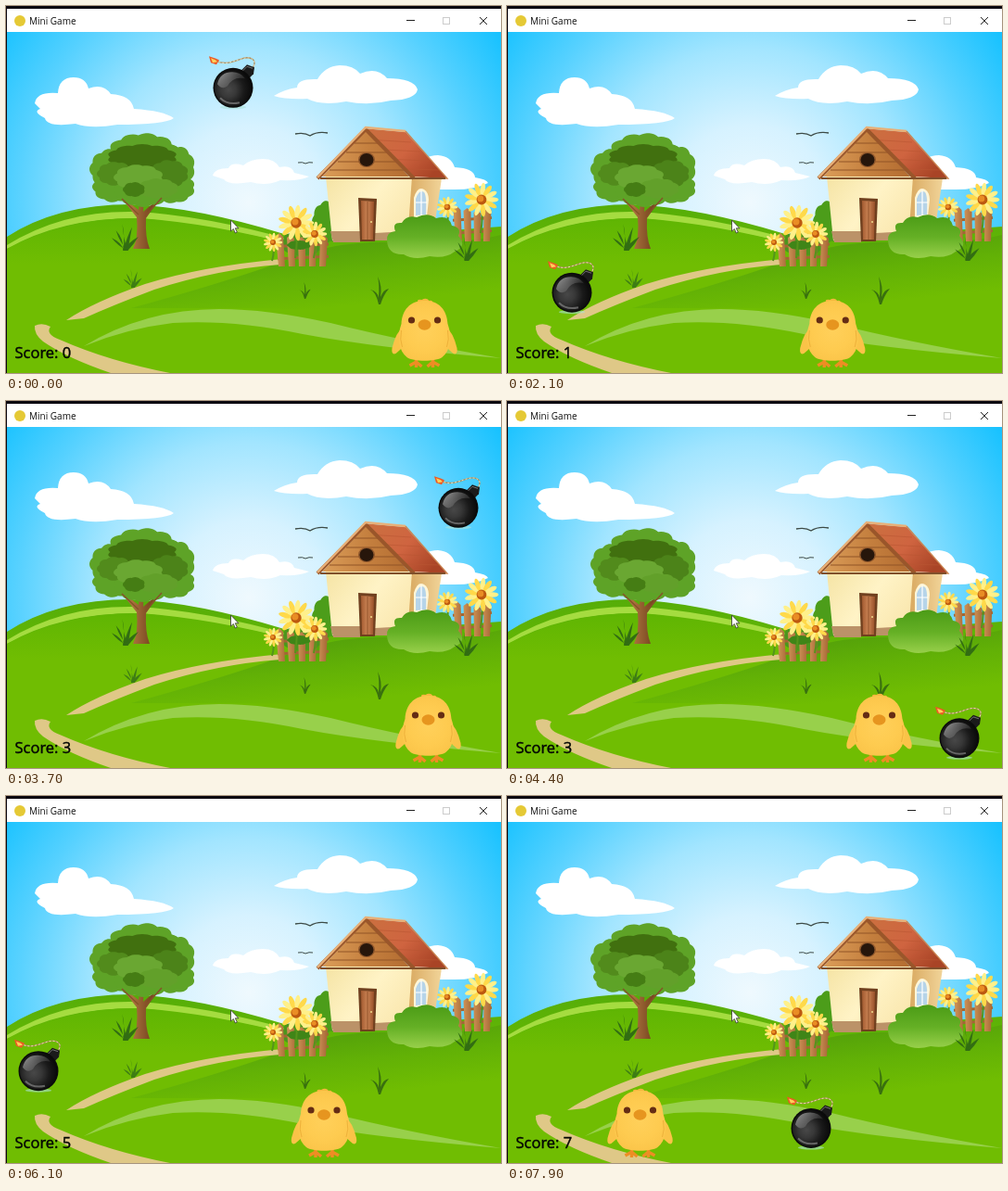
These frames come from a looping animation (534x396 px, 8000 ms). An HTML page with a canvas:

```html
<!DOCTYPE html>
<html lang="en">
<head>
<meta charset="utf-8">
<title>Mini Game</title>
<style>
html, body { margin: 0; width: 100%; height: 100%; overflow: hidden; background: #000; }
canvas { display: block; }
</style>
</head>
<body>
<canvas id="stage" width="534" height="396"></canvas>
<script>
const W = 534, H = 396, TOP = 28, LOOP = 8000;
const view = document.getElementById('stage').getContext('2d');
const scene = document.createElement('canvas');
scene.width = W;
scene.height = H;
let g = scene.getContext('2d');

function shape(d, color) { g.fillStyle = color; g.fill(new Path2D(d)); }
function line(d, color, width) {
  g.strokeStyle = color;
  g.lineWidth = width;
  g.stroke(new Path2D(d));
}
function oval(x, y, rx, ry, color, turn = 0) {
  g.beginPath();
  g.ellipse(x, y, rx, ry, turn, 0, 7);
  g.fillStyle = color;
  g.fill();
}
function ramp(x0, y0, x1, y1, ...colors) {
  const r = g.createLinearGradient(x0, y0, x1, y1);
  colors.forEach((c, i) => r.addColorStop(i / (colors.length - 1), c));
  return r;
}
function glow(x, y, r, ...colors) {
  const s = g.createRadialGradient(x, y, 0, x, y, r);
  colors.forEach((c, i) => s.addColorStop(i / (colors.length - 1), c));
  return s;
}
// A ring of lobes around a solid middle
function foliage(x, y, rx, ry, lobes, color) {
  g.beginPath();
  for (let i = 0; i <= lobes * 8; i++) {
    const a = i / (lobes * 8) * Math.PI * 2;
    const k = 0.91 + 0.09 * Math.abs(Math.sin(a * lobes / 2));
    g.lineTo(x + Math.cos(a) * rx * k, y + Math.sin(a) * ry * k);
  }
  g.fillStyle = color;
  g.fill();
}

function sky() {
  g.fillStyle = glow(262, 212, 335, '#eff9fe', '#d6f2ff', '#a2e5ff', '#56d1ff', '#10c0ff');
  g.fillRect(1, TOP, W, H);
  shape('M31 105Q33 92 56 94Q57 77 73 77Q86 77 89 89Q105 83 113 95Q135 96 138 111Q170 113 181 121Q172 128 120 128Q92 133 75 127Q44 131 42 121Q28 114 37 111Z', '#fff');
  shape('M289 97Q300 90 314 88Q314 78 336 79Q344 65 360 64Q375 64 382 73Q400 65 411 78Q440 78 444 90Q442 101 415 102Q391 108 367 103Q340 108 325 100Q302 101 289 97Z', '#fff');
  shape('M223 183Q225 175 240 175Q243 168 256 172Q264 165 277 165Q290 165 295 174Q308 171 311 180L327 184Q318 189 296 188Q281 195 264 190Q240 194 235 187Z', '#fff');
  shape('M440 175Q450 161 466 161Q480 162 484 174Q505 175 506 185Q519 187 520 191Q505 199 478 198L440 198Z', '#fff');
  line('M312 138Q322 136 328 140Q336 135 347 137', '#3c4a45', 1.3);
  line('M315 169Q320 168 323 170Q327 168 331 169', '#3c4a45', 1);
}

function land() {
  shape('M1 249Q55 214 135 214Q205 217 300 246L360 251L534 238V396H1Z', ramp(0, 213, 0, 300, '#55ad08', '#6dbd03'));
  shape('M1 258Q62 220 140 222Q215 226 310 253L305 256Q220 237 145 229Q60 228 1 262Z', '#a5dc40');
  shape('M1 262Q65 228 145 229Q225 235 310 258L534 268V396H1Z', ramp(0, 228, 0, 330, '#5fb503', '#70bd02', '#70bd02'));
  shape('M135 326Q230 300 295 277Q350 253 420 255Q490 258 534 247V350Q390 325 240 326Z', ramp(320, 254, 328, 328, '#529f0b', '#62b106', '#70bd02'));
  shape('M65 339Q95 319 150 300Q210 281 298 273L296 279Q228 284 160 306Q115 323 84 337Z', '#dfc887');
  shape('M31 345Q39 341 48 346Q42 354 58 360Q110 383 177 396H113Q66 380 40 362Q30 354 31 345Z', '#dfc887');
  shape('M84 367Q150 327 230 327Q282 327 350 342Q430 362 534 380Q400 369 320 354Q245 338 180 342Q130 348 84 367Z', '#98d04b');
}

function tuft(x, y, size, color = '#326d13') {
  for (const [dx, dy] of [[-13, -12], [-9, -19], [-3, -25], [6, -22], [12, -13]]) {
    const tx = x + dx * size, ty = y + dy * size;
    shape(`M${x - 2 * size} ${y}Q${x + dx * 0.2 * size} ${y + dy * 0.6 * size} ${tx} ${ty}Q${x + dx * 0.6 * size} ${y + dy * 0.4 * size} ${x + 2 * size} ${y}Z`, color);
  }
}
function sprout(x, y, s) {
  shape(`M${x} ${y}Q${x - 3 * s} ${y - 14 * s} ${x - 9 * s} ${y - 16 * s}Q${x - 1 * s} ${y - 14 * s} ${x} ${y - 7 * s}Q${x + 1 * s} ${y - 22 * s} ${x - 1 * s} ${y - 30 * s}Q${x + 4 * s} ${y - 20 * s} ${x + 2 * s} ${y - 8 * s}Q${x + 5 * s} ${y - 16 * s} ${x + 11 * s} ${y - 17 * s}Q${x + 5 * s} ${y - 10 * s} ${x + 2 * s} ${y}Z`, '#39700f');
}

function tree() {
  shape('M137 262Q143 250 141 228L122 204L143 220L145 200H149L148 222L168 205L151 229Q150 250 155 262Z', ramp(137, 0, 155, 0, '#a9713d', '#7c4a22'));
  const leaf = '#5ea327';
  foliage(114, 176, 24, 22, 9, leaf);
  foliage(117, 195, 24, 17, 9, leaf);
  foliage(148, 161, 40, 24, 11, leaf);
  foliage(182, 174, 22, 24, 9, leaf);
  foliage(180, 196, 24, 17, 9, leaf);
  foliage(148, 198, 32, 19, 10, leaf);
  foliage(147, 163, 38, 14, 10, '#41700f');
  foliage(176, 181, 21, 15, 9, '#4c8319');
  foliage(118, 181, 20, 13, 9, '#528b1c');
  foliage(143, 185, 27, 14, 9, '#6aa732');
  foliage(164, 197, 22, 11, 9, '#62a02a');
  foliage(138, 198, 12, 8, 7, '#457d14');
  line('M125 208L143 225M168 207L150 227', '#865329', 1.5);
}

function house() {
  foliage(347, 233, 17, 23, 9, '#4c9d1a');
  shape('M435 184L470 186L463 232L434 251Z', ramp(434, 0, 470, 0, '#d9a960', '#f1d499'));
  shape('M345 184H438L433 253H352Z', ramp(345, 185, 430, 250, '#f5e4a5', '#fff3c6', '#f9e5ab'));
  shape('M350 243H382V255H353ZM398 245L434 243L433 253H398Z', '#bb9268');
  shape('M385 132L431 136L476 186L438 184Z', ramp(400, 135, 455, 187, '#cc6e40', '#cf6440', '#a94426'));
  for (let i = 1; i < 5; i++) {
    line(`M${388 + i * 10} ${134 + i * 10.5}L${427 + i * 10} ${137 + i * 10}`, '#b95733', 0.6);
  }
  shape('M389 134L435 184H341Z', ramp(345, 0, 435, 0, '#d99b57', '#c5803f', '#b36c31'));
  line('M376 148H403M367 158H412M358 168H421M349 177H430', '#915426', 1);
  line('M336 186L388 133L440 186', '#9a562a', 4);
  line('M336 185L388 131L431 135', '#e8b078', 2.5);
  line('M431 135L476 186H438', '#c98450', 1.3);
  line('M339 186H474', '#80502b', 2);
  oval(389, 166, 9, 8, '#8e562b');
  oval(389, 166, 7.5, 7, '#27160b');
  shape('M380 207L400 208L398 254H382Z', '#70401f');
  shape('M383 210L397 211L396 252H384Z', ramp(383, 0, 397, 0, '#a45b31', '#c98354', '#985029'));
  line('M390 211V252', '#83451f', 0.8);
  oval(394, 233, 1, 1, '#f3dd8d');
  shape('M440 229V207Q444 194 451 198Q456 201 456 209L454 227Z', '#fff6d8');
  shape('M442 226V208Q446 197 451 201Q454 204 453 225Z', '#b6d4e9');
  line('M448 199V227M442 212H454', '#fff', 1.2);
}

function flower(x, y, r) {
  line(`M${x} ${y}Q${x + 2} ${y + r} ${x - 1} ${y + r * 2}`, '#55931c', 2);
  for (let i = 0; i < 13; i++) {
    const a = i / 13 * Math.PI * 2;
    oval(x + Math.cos(a) * r * 0.62, y + Math.sin(a) * r * 0.62, r * 0.4, r * 0.15, i % 2 ? '#ffd94a' : '#fff08a', a);
  }
  oval(x, y, r * 0.3, r * 0.3, '#bd590f');
  oval(x - r * 0.06, y - r * 0.06, r * 0.19, r * 0.19, '#e98d24');
}
function fence(x, y, posts, gap, h) {
  line(`M${x - 2} ${y + h * 0.4}L${x + posts * gap} ${y + h * 0.33}M${x} ${y + h * 0.77}L${x + posts * gap} ${y + h * 0.7}`, '#a06735', 3);
  for (let i = 0; i < posts; i++) {
    const px = x + i * gap, top = y + (i * 7 % 3) * 2, lean = i - (posts - 1) / 2;
    shape(`M${px + lean} ${top + 3}L${px + 4 + lean} ${top}L${px + 8 + lean} ${top + 4}L${px + 8} ${y + h}L${px + 1} ${y + h}Z`, ramp(px, 0, px + 9, 0, '#cc9055', '#a86a37'));
  }
}
function garden() {
  foliage(320, 256, 24, 14, 9, '#4d951d');
  fence(293, 245, 5, 11, 36);
  foliage(316, 258, 13, 5, 7, '#3f8517');
  flower(313, 234, 19);
  flower(333, 246, 13);
  flower(288, 255, 10);
  fence(484, 216, 4, 10, 38);
  flower(513, 209, 18);
  flower(476, 217, 11);
  shape('M411 253Q410 244 420 243Q416 233 427 234Q432 225 443 228Q455 222 464 229Q478 225 481 237Q492 239 488 248Q498 259 484 265Q474 273 457 270Q440 275 429 268Q412 269 411 253Z', ramp(0, 226, 0, 273, '#4c9c17', '#65b025', '#9ad14c'));
}

function frame() {
  g.fillStyle = '#0b0610';
  g.fillRect(0, 0, W, 3);
  g.fillRect(0, 0, 1, H);
  g.fillStyle = '#fff';
  g.fillRect(1, 3, W, TOP - 3);
  oval(15, 16, 6, 6, '#e5c935');
  g.fillStyle = '#111';
  g.font = '10px "Open Sans", "Noto Sans", sans-serif';
  g.fillText('Mini Game', 25, 20);
  line('M432 15.5H441M511 12L519 20M519 12L511 20', '#222', 1);
  g.strokeStyle = '#ccc';
  g.strokeRect(471.5, 12.5, 7, 7);
}

function paintScene() {
  sky();
  land();
  tree();
  house();
  garden();
  tuft(129, 264, 1.15);
  tuft(137, 304, 0.8, '#3e7d15');
  tuft(497, 275, 1.05);
  sprout(322, 316, 0.6);
  sprout(402, 322, 1);
  frame();
}

function bomb(x, y) {
  g.save();
  g.translate(x, y);
  oval(0, 21, 14, 2, 'rgba(170,225,215,.6)');
  const fuse = 'M20 -20C28 -30 19 -35 8 -31C-4 -27 -9 -25 -19 -29';
  line(fuse, '#a98d5c', 1.3);
  g.setLineDash([2, 2]);
  line(fuse, '#eddcb4', 1);
  g.setLineDash([]);
  shape('M-26 -34L-20 -32L-15 -30L-18 -25L-24 -27Z', '#ed5a24');
  shape('M-24 -32L-19 -30L-17 -28L-22 -27Z', '#ffd05a');
  shape('M8 -18L15 -25L23 -22L22 -15L16 -9Z', '#1b1b1b');
  line('M10 -18L15 -23L21 -21', '#737373', 1);
  oval(0, 0, 21.5, 21.5, '#0b0b0b');
  oval(0, 0, 20, 20, glow(-5, 2, 25, '#484848', '#383838', '#1a1a1a', '#0a0a0a'));
  shape('M-17 -4Q-14 -17 -1 -17Q8 -17 13 -10Q0 -13 -6 -2Q-12 3 -17 -4Z', ramp(-12, -16, 4, 2, 'rgba(205,205,205,.65)', 'rgba(90,90,90,.15)'));
  line('M-14 11Q-6 19 7 16', 'rgba(150,150,150,.6)', 2);
  g.restore();
}

function chick(x) {
  g.save();
  g.translate(x, 0);
  for (const s of [-1, 1]) {
    line(`M${s * 9} 379V390M${s * 3} 389L${s * 9} 384L${s * 16} 388`, '#ee8d24', 3.4);
    shape(`M${s * 22} 345Q${s * 31} 352 ${s * 35} 369Q${s * 36} 377 ${s * 31} 375L${s * 23} 368Z`, '#fac348');
  }
  shape('M-7 320Q-9 316 -3 317Q2 314 5 318Q10 317 8 322Z', '#f6b73e');
  shape('M0 318C16 318 24 328 25 343C30 357 28 372 19 379C12 384 -12 384 -19 379C-28 372 -30 357 -25 343C-24 328 -16 318 0 318Z', glow(0, 350, 42, '#ffd05a', '#fecb50', '#f9c146'));
  line('M-25 350Q-27 360 -24 368M25 350Q27 360 24 368', '#eeb13a', 1);
  oval(-14, 339, 3.6, 3.6, '#652d14');
  oval(14, 339, 3.6, 3.6, '#652d14');
  oval(0, 344, 7, 5.8, '#e6951f');
  g.restore();
}

function pointer() {
  const d = 'M242.5 231V243L245.3 240.5L247.3 245L249.3 244L247.3 239.8H251Z';
  shape(d, '#fff');
  line(d, '#333', 0.8);
}

// Each drop: time, x and y of one point on its way down
const drops = [
  [0, 245, 88], [1400, 70, 101], [2800, 148, 173], [3700, 488, 115],
  [5100, 171, 260], [5540, 35, 65], [7000, 495, 327], [7900, 328, 358]
];
const FLOOR = 431;

// Every point scored makes the next bomb faster
function height(score, t) {
  const [at, , y] = drops[score];
  return y + (0.268 + 0.029 * score) * (t - at);
}

// The chick stands still between short walks
const walk = [
  [0, 451.5], [1700, 451.5], [2400, 276.5], [2900, 276.5], [3600, 455.5], [3750, 455.5],
  [3950, 401.5], [5700, 401.5], [5920, 343], [7150, 343], [7890, 143.5], [8001, 143.5]
];

function along(keys, t) {
  const i = keys.findIndex(k => k[0] > t);
  const [t0, a] = keys[i - 1], [t1, b] = keys[i];
  return a + (b - a) * (t - t0) / (t1 - t0);
}

function draw(t) {
  g = view;
  g.drawImage(scene, 0, 0);
  const score = drops.findIndex((d, i) => height(i, t) < FLOOR);
  g.save();
  g.beginPath();
  g.rect(1, TOP, W - 1, H - TOP);
  g.clip();
  chick(along(walk, t));
  bomb(drops[score][1], height(score, t));
  g.font = '16.5px "Open Sans", "Noto Sans", sans-serif';
  g.fillStyle = g.strokeStyle = '#050805';
  g.lineWidth = 0.45;
  g.fillText('Score: ' + score, 9.5, 380);
  g.strokeText('Score: ' + score, 9.5, 380);
  g.restore();
  pointer();
}

paintScene();
const start = performance.now();
function tick(now) {
  draw(Math.max(0, now - start) % LOOP);
  requestAnimationFrame(tick);
}
draw(0);
requestAnimationFrame(tick);
</script>
</body>
</html>
```
